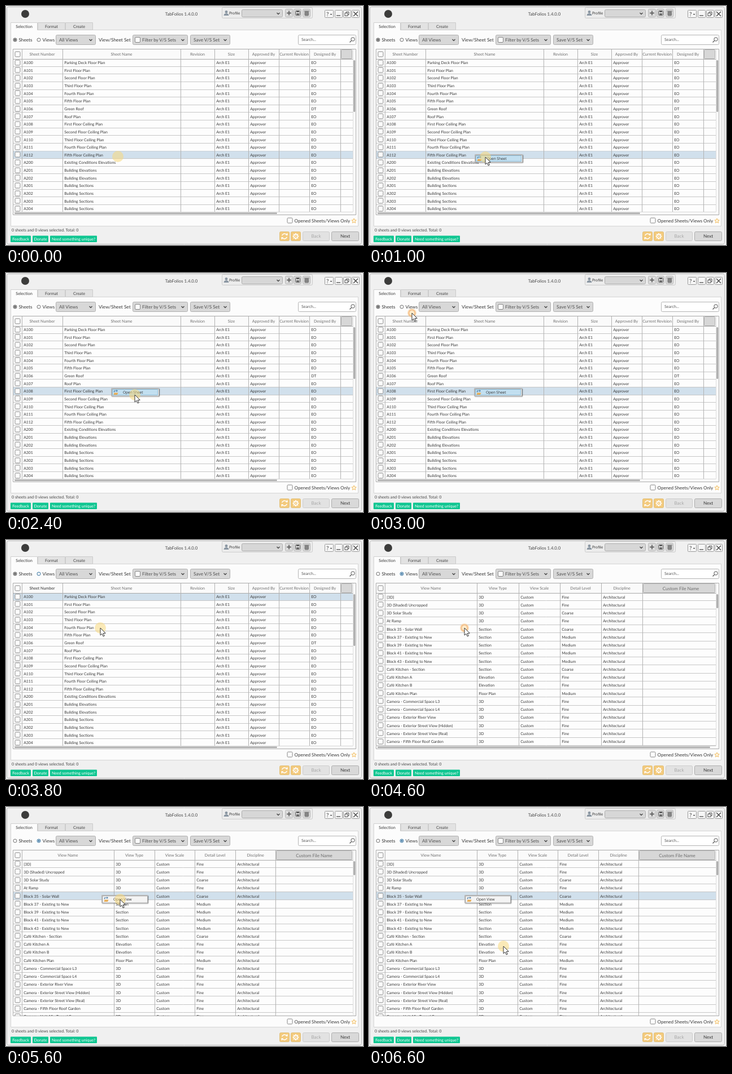
An HTML page with a canvas that plays this animation: 632x424 px, repeating every 7400 ms.

```html
<!DOCTYPE html>
<html lang="en">
<head>
<meta charset="utf-8">
<title>Sheet manager</title>
<style>
html, body { margin: 0; width: 100%; height: 100%; overflow: hidden; background: #f1f1f1; }
canvas { display: block; width: 632px; height: 424px; }
</style>
</head>
<body>
<canvas id="stage" width="632" height="424"></canvas>
<script>
const ctx = document.getElementById('stage').getContext('2d');
const LOOP = 7400, STEP = 100;
const UI = 'Lato, "Open Sans", sans-serif';
const MENU = '"Open Sans", "Noto Sans", sans-serif';
const INK = '#383838', LINE = '#c6c6c6', EDGE = '#a9a9a9', SELECTED = '#d1e0ec';

const floors = ['First', 'Second', 'Third', 'Fourth', 'Fifth'];
const sheetNames = ['Parking Deck Floor Plan', ...floors.map(f => f + ' Floor Plan'),
  'Green Roof', 'Roof Plan', ...floors.map(f => f + ' Floor Ceiling Plan'),
  'Existing Conditions Elevations', 'Building Elevations', 'Building Elevations',
  ...Array(4).fill('Building Sections')];
const sheetNumber = i => 'A' + (i < 13 ? 100 + i : i < 16 ? 187 + i : 285 + i);
const sheetRows = sheetNames.map((name, i) =>
  [sheetNumber(i), name, '', 'Arch E1', 'Approver', '', i === 6 ? 'DT' : 'EO']);

const cam = 'Camera - ';
const viewRows = [
  ['{3D}', '3D', 'Fine'], ['3D (Shaded) Uncropped', '3D', 'Fine'],
  ['3D Solar Study', '3D', 'Coarse'], ['At Ramp', '3D', 'Fine'],
  ['Block 35 - Solar Wall', 'Section', 'Coarse'],
  ...[37, 39, 41, 43].map(n => [`Block ${n} - Existing to New`, 'Section', 'Medium']),
  ['Café Kitchen - Section', 'Section', 'Coarse'],
  ['Café Kitchen A', 'Elevation', 'Fine'], ['Café Kitchen B', 'Elevation', 'Fine'],
  ['Café Kitchen Plan', 'Floor Plan', 'Medium'],
  ...['Commercial Space L3', 'Commercial Space L4', 'Exterior River View',
    'Exterior Street View (Hidden)', 'Exterior Street View (Real)',
    'Fifth Floor Roof Garden', 'Unit 15 - Tunnel C'].map(v => [cam + v, '3D', 'Fine'])
].map(([name, type, detail]) => [name, type, 'Custom', detail, 'Architectural']);

const sheets = {
  rows: sheetRows, pitch: 13.63, cols: [28, 100, 309, 369, 429, 483, 537, 592, 614],
  heads: ['Sheet Number', 'Sheet Name', 'Revision', 'Size', 'Approved By', 'Current Revision', 'Designed By', ''],
  hbar: 480, vbar: 188
};
const viewHeads = ['View Name', 'View Type', 'View Scale', 'Detail Level', 'Discipline', 'Custom File Name'];
const viewsWide = { rows: viewRows, pitch: 14.25, cols: [28, 191, 265, 338, 411, 484, 620], heads: viewHeads, hbar: 604, vbar: 121 };
const viewsFit = { ...viewsWide, cols: [28, 191, 263, 334, 406, 477, 614], hbar: 0 };

// time, x, y of the pointer
const path = [
  [0, 198, 267], [400, 206, 268], [1000, 206, 268], [1500, 187, 205], [1700, 187, 205],
  [2000, 228, 216], [2500, 228, 216], [3000, 76, 71], [3300, 70, 60], [3400, 70, 60],
  [3800, 167, 156], [4400, 167, 156], [4600, 169, 156], [5200, 170, 156],
  [5600, 202, 164], [5900, 238, 247], [LOOP, 238, 247]
];
const clicks = [1600, 3000, 4600];

function text(s, x, y, size = 6.9, color = INK, align = 'left', font = UI) {
  ctx.font = size + 'px ' + font;
  ctx.textAlign = align;
  ctx.fillStyle = color;
  ctx.fillText(s, x, y + size * 0.35);
}
function paint(fill, stroke, width = 1) {
  if (fill) { ctx.fillStyle = fill; ctx.fill(); }
  if (stroke) { ctx.strokeStyle = stroke; ctx.lineWidth = width; ctx.stroke(); }
}
function box(x, y, w, h, fill, stroke, r = 0) {
  ctx.beginPath();
  ctx.roundRect(x, y, w, h, r);
  paint(fill, stroke);
}
function poly(points, stroke, width = 1, fill) {
  ctx.beginPath();
  points.forEach(([x, y]) => ctx.lineTo(x, y));
  if (fill) ctx.closePath();
  paint(fill, stroke, width);
}
function circle(x, y, r, fill, stroke, width) {
  ctx.beginPath();
  ctx.arc(x, y, r, 0, Math.PI * 2);
  paint(fill, stroke, width);
}
const checkbox = (x, y) => box(x - 4.5, y - 4.5, 9, 9, '#fdfdfd', '#858585', 1.5);
const arrow = (x, y) => poly([[x - 2.5, y - 1], [x, y + 1.5], [x + 2.5, y - 1]], '#444', 1.3);

function combo(x, w, label, textX, size = 8.3) {
  box(x + .5, 51.5, w, 17, '#d8d8d8', '#b0b0b0', 2);
  text(label, textX, 60, size, '#505050');
  arrow(x + w - 8, 60);
}

function titleBar() {
  circle(34, 14, 7, '#3c3c3b');
  text('TabFolios 1.4.0.0', 310.5, 14, 7.8, '#484848', 'center');
  box(382.5, 2.5, 160, 19, '#ececec', '#cccccc', 2);
  circle(390, 10.5, 2.4, '#8a96a2');
  poly([[385.5, 17], [386.5, 14], [390, 13], [393.5, 14], [394.5, 17]], null, 0, '#8a96a2');
  text('Profile', 395, 13, 6.8);
  box(417.5, 6.5, 72, 13, '#d7d7d7', '#adadad', 2);
  arrow(482, 13);
  [494, 509, 525].forEach(x => box(x + .5, 5.5, 13, 14, '#dadada', '#b5b5b5', 2));
  poly([[497, 12.5], [505, 12.5]], '#555', 1.6);
  poly([[501, 8.5], [501, 16.5]], '#555', 1.6);
  box(512.5, 8.5, 8, 8, '#ddd', '#5c5c5c', 1);
  box(514, 8.5, 5, 2.5, '#5c5c5c');
  box(514, 13, 5, 3.5, '#6c6c6c');
  box(529, 10, 6.5, 7, '#858585', '#777', 1);
  poly([[527.5, 9], [537, 9]], '#777', 1.2);
  [[564, 15], [582, 13], [597, 13], [612, 13]].forEach(([x, w]) => box(x + .5, 7.5, w, 13, '#f6f6f6', '#9a9a9a', 1));
  text('?', 567, 14, 10, '#444');
  poly([[573.5, 14], [577.5, 14], [575.5, 16]], null, 0, '#444');
  poly([[585, 17], [592, 17]], '#444', 1.2);
  box(602, 10.5, 5, 5, null, '#555');
  box(600, 12.5, 5, 5, '#f6f6f6', '#555');
  poly([[615, 10], [623, 18]], '#444', 1.2);
  poly([[623, 10], [615, 18]], '#444', 1.2);
}

function radio(x, on, color) {
  circle(x, 60, 3, '#fff', color);
  if (on) circle(x, 60, 1.7, color);
}

function controls(t) {
  box(8.5, 42.5, 615, 348, '#fcfcfc', '#d4d4d4');
  [['Format', 57], ['Create', 106]].forEach(([s, x]) => {
    box(x - .5, 29.5, 48, 13, '#e2e2e2', '#cccccc');
    text(s, x + 23.5, 36, 7.3, '#444', 'center');
  });
  box(8.5, 29.5, 47, 13, '#fcfcfc', '#d0d0d0');
  box(9, 41, 46, 3, '#fcfcfc');
  text('Selection', 32, 36, 7.3, INK, 'center');

  const onViews = t >= 4200;
  radio(16, !onViews, onViews ? '#707070' : '#444');
  radio(58, onViews, t >= 3300 ? '#35729f' : '#707070');
  text('Sheets', 22.5, 60, 8.2);
  text('Views', 64.5, 60, 8.2);
  combo(88, 70, 'All Views', 94);
  text('View/Sheet Set', 164, 60, 8.3);
  combo(224, 97, 'Filter by V/S Sets', 241, 8);
  checkbox(233, 60);
  combo(326, 70, 'Save V/S Set', 332);
  box(517.5, 51.5, 102, 17, '#fff', '#b4b4b4', 2);
  text('Search...', 523, 60, 7.1, '#555');
  circle(614, 59, 3.2, null, '#555');
  poly([[611.5, 61.5], [608.5, 64.5]], '#555', 1.3);
}

function gear(x, y) {
  for (let i = 0; i < 8; i++) {
    const c = Math.cos(i * Math.PI / 4), s = Math.sin(i * Math.PI / 4);
    poly([[x + c * 3.6, y + s * 3.6], [x + c * 5.4, y + s * 5.4]], '#fff', 1.8);
  }
  circle(x, y, 3.3, null, '#fff', 1.4);
  circle(x, y, 1, '#fff');
}

function footer() {
  checkbox(502.5, 380.5);
  text('Opened Sheets/Views Only', 510.5, 381, 8.1);
  const star = Array.from({ length: 10 }, (_, i) => {
    const a = i * Math.PI / 5 - Math.PI / 2, r = i % 2 ? 2 : 4.4;
    return [616 + r * Math.cos(a), 381.3 + r * Math.sin(a)];
  });
  poly(star, '#f1bd62', 1, '#fff8e6');
  text('0 sheets and 0 views selected. Total: 0', 10, 398, 7.1, '#444');
  [['Feedback', 8, 36], ['Donate', 47, 28], ['Need something unique?', 78, 83]].forEach(([s, x, w]) => {
    box(x, 407.5, w, 11.5, '#0fc691', null, 1);
    text(s, x + w / 2, 413.2, 7.1, '#fff', 'center');
  });
  [484, 504].forEach(x => box(x + .5, 400.5, 17, 16, '#f3ca7d', '#e0c07a', 2));
  for (const a of [0, Math.PI]) {
    ctx.beginPath();
    ctx.arc(493, 408.5, 4.5, a + .3, a + 2.7);
    paint(null, '#fff', 1.4);
  }
  poly([[495, 406.5], [499, 406.5], [498, 402.5]], null, 0, '#fff');
  poly([[491, 410.5], [487, 410.5], [488, 414.5]], null, 0, '#fff');
  gear(513, 408.5);
  box(525.5, 400.5, 47, 16, '#e2e2e2', '#cdcdcd', 2);
  text('Back', 549, 408.5, 8, '#a8a8a8', 'center');
  box(576.5, 400.5, 48, 16, '#d9d9d9', '#adadad', 2);
  text('Next', 600.5, 408.5, 8, INK, 'center');
}

function table({ rows, pitch, cols, heads, hbar, vbar }, selected, hoverHead) {
  const bottom = hbar ? 365.5 : 370.5, top = 94;
  box(12.5, 76.5, 607, 294, '#fdfdfd', EDGE);
  ctx.save();
  ctx.beginPath();
  ctx.rect(12, top, 602, bottom - top);
  ctx.clip();
  rows.forEach((row, i) => {
    const y = top + i * pitch, mid = y + pitch / 2;
    if (i === selected) box(13, y, 601, pitch, SELECTED);
    const edge = Math.round(y + pitch) - .5;
    poly([[13, edge], [614, edge]], LINE);
    checkbox(20.5, Math.round(mid) - .5);
    row.forEach((s, c) => s && text(s, cols[c] + 3.2, mid));
  });
  ctx.restore();

  box(13, 77, 601, 17, '#fafafa');
  poly([[12, 94.5], [614, 94.5]], EDGE);
  cols.slice(0, -1).forEach(x => poly([[x + .5, 77], [x + .5, bottom]], '#b2b2b2'));
  poly([[614.5, 77], [614.5, bottom]], '#dedede');
  checkbox(20.5, 85.5);
  const lastCol = heads.length - 1, left = cols[lastCol];
  box(left + 1.5, 77.5, 611 - left, 16, '#d7d7d7', '#b0b0b0', 1);
  heads.forEach((s, i) => text(s, (cols[i] + cols[i + 1]) / 2, 85.8, i === lastCol ? 8 : 7.1,
    i === 0 && hoverHead ? '#2c2c2c' : '#6e6e6e', 'center'));
  if (hbar) {
    poly([[12, 365.5], [614, 365.5]], '#d6d6d6');
    box(15, 366.5, hbar - 15, 2.4, '#a8a8a8', null, 1.2);
  }
  box(615.2, 96, 3, vbar - 96, '#a8a8a8', null, 1.5);
}

function menu(x, y, w, label, hover) {
  ctx.save();
  ctx.shadowColor = 'rgba(0,0,0,.5)';
  ctx.shadowBlur = 1.5;
  ctx.shadowOffsetX = ctx.shadowOffsetY = 1;
  box(x, y, w, 13.5, '#f4f4f4', '#bdbdbd');
  ctx.restore();
  if (hover) box(x + 2, y + 2, w - 4, 10, '#c2dff0', '#8fc0dc');
  poly([[x + 5, y + 8], [x + 12, y + 8], [x + 10.5, y + 11.5], [x + 4, y + 11.5]], null, 0, '#e9ad55');
  poly([[x + 5, y + 7], [x + 5, y + 4.5], [x + 9.5, y + 4.5]], '#4a7ca6', 1.2);
  poly([[x + 9, y + 2.5], [x + 11.5, y + 4.5], [x + 9, y + 6.5]], null, 0, '#4a7ca6');
  text(label, x + 20.5, y + 7.5, 6.5, '#2c2c2c', 'left', MENU);
}

function pointerAt(t) {
  const i = path.findIndex((p, k) => k && t <= p[0]);
  const [t0, x0, y0] = path[i - 1], [t1, x1, y1] = path[i];
  const u = (t - t0) / (t1 - t0), e = u * u * (3 - 2 * u);
  return [x0 + (x1 - x0) * e, y0 + (y1 - y0) * e];
}

function pointer(t) {
  const [x, y] = pointerAt(t);
  const pressed = clicks.some(c => t >= c && t < c + 200);
  circle(x, y, pressed ? 8 : 10, pressed ? 'rgba(250,205,150,.55)' : 'rgba(248,216,125,.55)');
  if (pressed) circle(x, y, 5.5, 'rgba(255,238,205,.7)', 'rgba(243,165,95,.55)', 2.2);
  if (t < 100) return;
  const shape = [[0, 0], [0, 13], [3, 10.3], [5.2, 15], [7.3, 14], [5.1, 9.6], [9.2, 9.3]];
  poly(shape.map(([a, b]) => [x + a, y + b]), '#333', 1, '#fff');
}

const within = (t, a, b) => t >= a && t < b;

function draw(t) {
  box(0, 0, 632, 424, '#f8f8f8');
  box(1.5, 1.5, 628, 421, '#f0f0f0', '#b8b8b8', 3);
  titleBar();
  controls(t);
  if (t < 4400) {
    const selected = t < 2100 ? 12 : t < 3500 ? 8 : 0;
    table(sheets, selected, t >= 3500);
  } else {
    table(t < 4900 ? viewsWide : viewsFit, t < 5200 ? -1 : 4, false);
  }
  footer();
  if (within(t, 500, 2100)) menu(187.5, 263.5, 84, 'Open Sheet', within(t, 700, 1800));
  if (within(t, 2300, 3400)) menu(186.5, 204.5, 84, 'Open Sheet', t >= 2400);
  if (t >= 5400) menu(169.5, 156.5, 81, 'Open View', within(t, 5700, 6600));
  pointer(t);
}

const start = performance.now();
ctx.textRendering = 'geometricPrecision';
function tick() {
  const t = (performance.now() - start) % LOOP;
  draw(Math.floor(t / STEP) * STEP);
  requestAnimationFrame(tick);
}
tick();
</script>
</body>
</html>
```
